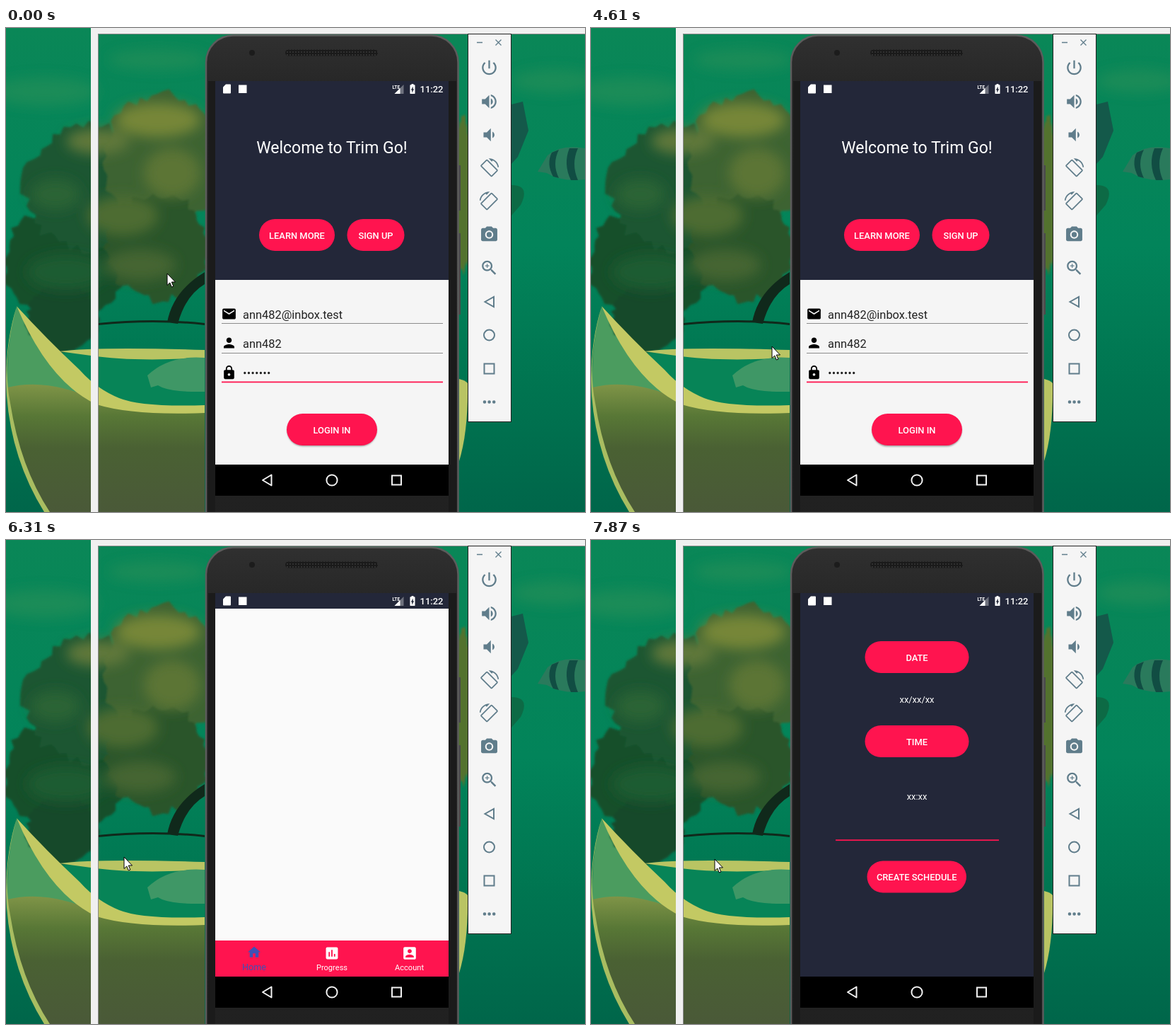
These frames come from a looping animation (819 px wide and 684 px high, 8000 ms). An HTML page:

```html
<!DOCTYPE html>
<html lang="en">
<head>
<meta charset="utf-8">
<title>Phone emulator</title>
<style>
  html, body { margin: 0; width: 100%; height: 100%; overflow: hidden; background: #00704e; }
  svg.stage { display: block; width: 100%; height: 100%; }
  text { font-family: Roboto, "Open Sans", sans-serif; }
  .btn rect { fill: #ff144f; }
  .btn text { fill: #fff; font-size: 12.9px; font-weight: 500; text-anchor: middle; }
  .mid { text-anchor: middle; }
  .field { font-size: 16.4px; fill: #212121; }
  .tab { font-size: 11.1px; fill: #fff; text-anchor: middle; }
  .line { fill: none; stroke-width: 2; }
</style>
</head>
<body>
<svg class="stage" viewBox="0 0 819 684">
  <defs>
    <linearGradient id="sea" x1="0" y1="0" x2="0" y2="1">
      <stop offset="0" stop-color="#0a8757"/>
      <stop offset=".45" stop-color="#02845a"/>
      <stop offset=".75" stop-color="#007450"/>
      <stop offset="1" stop-color="#00664a"/>
    </linearGradient>
    <linearGradient id="ground" x1="0" y1="0" x2="0" y2="1">
      <stop offset="0" stop-color="#7f9447"/>
      <stop offset=".25" stop-color="#587736"/>
      <stop offset=".5" stop-color="#4a6133"/>
      <stop offset="1" stop-color="#4a5938"/>
    </linearGradient>
    <linearGradient id="body" x1="0" y1="0" x2="0" y2="1">
      <stop offset="0" stop-color="#303030"/>
      <stop offset=".1" stop-color="#262626"/>
      <stop offset="1" stop-color="#202020"/>
    </linearGradient>
    <filter id="soft" x="-30%" y="-60%" width="160%" height="220%"><feGaussianBlur stdDeviation="9"/></filter>
    <filter id="edge" x="-5%" y="-5%" width="110%" height="110%"><feGaussianBlur stdDeviation="1.5"/></filter>
    <filter id="drop" x="-10%" y="-20%" width="120%" height="150%"><feGaussianBlur stdDeviation="1.1"/></filter>
    <clipPath id="glass"><rect x="296" y="75" width="330" height="586"/></clipPath>
    <pattern id="mesh" width="4" height="4" patternUnits="userSpaceOnUse">
      <rect width="4" height="4" fill="#1a1a1a"/><circle cx="2" cy="2" r=".9" fill="#3a3a3a"/>
    </pattern>

    <path id="power" d="M13 3h-2v10h2V3zm4.83 2.17l-1.42 1.42C17.99 7.86 19 9.81 19 12c0 3.87-3.13 7-7 7s-7-3.13-7-7c0-2.19 1.01-4.14 2.58-5.42L6.17 5.17C4.23 6.82 3 9.26 3 12c0 4.97 4.03 9 9 9s9-4.03 9-9c0-2.74-1.23-5.18-3.17-6.83z"/>
    <path id="louder" d="M3 9v6h4l5 5V4L7 9H3zm13.5 3c0-1.77-1.02-3.29-2.5-4.03v8.05c1.48-.73 2.5-2.25 2.5-4.02zM14 3.23v2.06c2.89.86 5 3.54 5 6.71s-2.11 5.85-5 6.71v2.06c4.01-.91 7-4.49 7-8.77s-2.99-7.86-7-8.77z"/>
    <path id="quieter" d="M18.5 12c0-1.77-1.02-3.29-2.5-4.03v8.05c1.48-.73 2.5-2.25 2.5-4.02zM5 9v6h4l5 5V4L9 9H5z"/>
    <path id="turn" d="M16.48 2.52c3.27 1.55 5.61 4.72 5.97 8.48h1.5C23.44 4.84 18.29 0 12 0l-.66.03 3.81 3.81 1.33-1.32zm-6.25-.77c-.59-.59-1.54-.59-2.12 0L1.75 8.11c-.59.59-.59 1.54 0 2.12l12.02 12.02c.59.59 1.54.59 2.12 0l6.36-6.36c.59-.59.59-1.54 0-2.12L10.23 1.75zm4.6 19.44L2.81 9.17l6.36-6.36 12.02 12.02-6.36 6.36z"/>
    <g id="camera">
      <path fill-rule="evenodd" d="M9 2L7.17 4H4c-1.1 0-2 .9-2 2v12c0 1.1.9 2 2 2h16c1.1 0 2-.9 2-2V6c0-1.1-.9-2-2-2h-3.17L15 2H9zm3 15c-2.76 0-5-2.24-5-5s2.24-5 5-5 5 2.24 5 5-2.24 5-5 5z"/>
      <circle cx="12" cy="12" r="3.2"/>
    </g>
    <path id="zoom" d="M15.5 14h-.79l-.28-.27C15.41 12.59 16 11.11 16 9.5 16 5.91 13.09 3 9.5 3S3 5.91 3 9.5 5.91 16 9.5 16c1.61 0 3.09-.59 4.23-1.57l.27.28v.79l5 4.99L20.49 19l-4.99-5zm-6 0C7.01 14 5 11.99 5 9.5S7.01 5 9.5 5 14 7.01 14 9.5 11.99 14 9.5 14zM9 7h1v2h2v1h-2v2H9v-2H7V9h2z"/>
    <path id="mail" d="M20 4H4c-1.1 0-1.99.9-1.99 2L2 18c0 1.1.9 2 2 2h16c1.1 0 2-.9 2-2V6c0-1.1-.9-2-2-2zm0 4l-8 5-8-5V6l8 5 8-5v2z"/>
    <path id="person" d="M12 12c2.21 0 4-1.79 4-4s-1.79-4-4-4-4 1.79-4 4 1.79 4 4 4zm0 2c-2.67 0-8 1.34-8 4v2h16v-2c0-2.66-5.33-4-8-4z"/>
    <path id="lock" d="M18 8h-1V6c0-2.76-2.24-5-5-5S7 3.24 7 6v2H6c-1.1 0-2 .9-2 2v10c0 1.1.9 2 2 2h12c1.1 0 2-.9 2-2V10c0-1.1-.9-2-2-2zm-6 9c-1.1 0-2-.9-2-2s.9-2 2-2 2 .9 2 2-.9 2-2 2zm3.1-9H8.9V6c0-1.71 1.39-3.1 3.1-3.1 1.71 0 3.1 1.39 3.1 3.1v2z"/>
    <path id="house" d="M10 20v-6h4v6h5v-8h3L12 3 2 12h3v8z"/>
    <path id="chart" d="M19 3H5c-1.1 0-2 .9-2 2v14c0 1.1.9 2 2 2h14c1.1 0 2-.9 2-2V5c0-1.1-.9-2-2-2zM9 17H7v-7h2v7zm4 0h-2V7h2v10zm4 0h-2v-4h2v4z"/>
    <path id="account" fill-rule="evenodd" d="M3 5v14c0 1.1.89 2 2 2h14c1.1 0 2-.9 2-2V5c0-1.1-.9-2-2-2H5c-1.11 0-2 .9-2 2zm12 4c0 1.66-1.34 3-3 3s-3-1.34-3-3 1.34-3 3-3 3 1.34 3 3zm-9 8c0-2 4-3.1 6-3.1s6 1.1 6 3.1v1H6v-1z"/>
    <path id="battery" d="M15.67 4H14V2h-4v2H8.33C7.6 4 7 4.6 7 5.33v15.33C7 21.4 7.6 22 8.33 22h7.33c.74 0 1.34-.6 1.34-1.33V5.33C17 4.6 16.4 4 15.67 4zM11 20v-5.5H9L13 7v5.5h2L11 20z"/>
  </defs>

  <!-- wallpaper -->
  <rect width="819" height="684" fill="url(#sea)"/>
  <g filter="url(#soft)" fill="#2f9259" opacity=".5">
    <ellipse cx="55" cy="90" rx="75" ry="20"/>
    <ellipse cx="215" cy="45" rx="70" ry="14"/>
    <ellipse cx="775" cy="75" rx="60" ry="16"/>
  </g>
  <path d="M15 394Q30 440 75 458L281 466V684H58Q-12 570 4 470Z" fill="#078457"/>
  <path d="M15 394L110 520 60 540 2 520Q0 440 15 394Z" fill="#4b9c5f"/>
  <path d="M2 508Q50 496 110 518T281 543V684H58Q8 600 2 508Z" fill="url(#ground)"/>
  <g id="crown" filter="url(#edge)"></g>
  <g id="sunlit" filter="url(#soft)"></g>
  <path d="M228 416Q236 372 281 345V362Q254 378 243 418ZM130 417Q210 409 281 417V420Q210 412 130 420Z" fill="#10291b"/>
  <path d="M75 457Q130 450 281 455V466Q180 472 120 463Z" fill="#b9c463"/>
  <path d="M15 393Q58 440 104 483 128 510 160 523T281 533V544Q180 548 128 532 60 500 15 393Z" fill="#c3c963"/>
  <path d="M200 491Q230 462 281 466V514Q230 515 215 505L205 508Z" fill="#3f9766"/>
  <path d="M15 394Q-6 470 6 530Q20 620 62 684H54Q8 610 1 520Q-3 450 15 394Z" fill="#a9bd61"/>
  <path d="M641 496Q650 498 653 502Q654 570 641 612Z" fill="#b9c463"/>
  <path d="M715 108L731 104 739 145 724 182 715 192Z" fill="#14594a"/>
  <path d="M715 222Q742 222 728 250L715 265Z" fill="#0d6a45"/>
  <path d="M752 203L766 180Q785 164 819 170V214Q785 218 765 205Z" fill="#2a7a5c"/>
  <path d="M772 176Q764 192 774 210L782 212Q772 192 782 172ZM797 170Q788 192 799 215L809 215Q799 192 809 170Z" fill="#114d43"/>

  <!-- window frame -->
  <path d="M120 0H819V8H130V684H120Z" fill="#f0f0f0"/>
  <path d="M130.5 684V8.5H819" fill="none" stroke="#888"/>

  <!-- phone -->
  <path d="M640 194h3v64h-3zM640 290h3v115h-3z" fill="#4a4a4a"/>
  <rect x="283" y="10.5" width="356.5" height="760" rx="38" fill="url(#body)" stroke="#5c5c5c" stroke-width="2.5"/>
  <path d="M286 75h10v609h-10zM626 75h11v609h-11z" fill="#1b1b1b"/>
  <circle cx="348" cy="35" r="4" fill="#1c1c1c"/>
  <rect x="395" y="30.5" width="131" height="9" rx="4.5" fill="url(#mesh)"/>

  <g clip-path="url(#glass)">
    <g id="login">
      <rect x="296" y="75" width="330" height="281" fill="#232739"/>
      <rect x="296" y="356" width="330" height="261" fill="#f5f5f5"/>
      <rect x="296" y="617" width="330" height="44"/>
      <text class="mid" x="461" y="177" font-size="23" fill="#fff">Welcome to Trim Go!</text>
      <rect id="shade" x="397.5" y="545" width="127" height="45" rx="22.5" opacity=".36" filter="url(#drop)"/>
      <g id="loginButtons"></g>
      <text class="field" x="335" y="410.5">ann482@inbox.test</text>
      <text class="field" x="335" y="452">ann482</text>
      <path d="M337.8 487.5h36" stroke="#212121" stroke-width="3.3" stroke-linecap="round" stroke-dasharray="0 5.65"/>
      <path d="M305 417.5H618M305 459.5H618" stroke="#8c8c8c"/>
      <rect x="305" y="499.5" width="313" height="1.8" fill="#ff144f"/>
      <rect id="caret" x="374" y="476" width="1.7" height="22" fill="#ff144f"/>
      <g id="fieldIcons"></g>
    </g>
    <g id="home">
      <rect x="296" y="75" width="330" height="22" fill="#232739"/>
      <rect x="296" y="97" width="330" height="469" fill="#fafafa"/>
      <rect id="tabBar" x="296" y="566" width="330" height="51"/>
      <rect x="296" y="617" width="330" height="44"/>
      <g id="tabIcons"></g>
      <text class="tab" x="351" y="608" style="font-size:12.7px;fill:#3f51b5">Home</text>
      <text class="tab" x="461" y="608">Progress</text>
      <text class="tab" x="570.5" y="608">Account</text>
    </g>
    <g id="plan">
      <rect x="296" y="75" width="330" height="542" fill="#232739"/>
      <rect x="296" y="617" width="330" height="44"/>
      <g id="planButtons"></g>
      <g class="mid" fill="#fff" font-size="12.9">
        <text x="461" y="230">xx/xx/xx</text>
        <text x="461" y="367">xx:xx</text>
      </g>
      <rect x="346" y="423.3" width="231" height="1.8" fill="#ff144f"/>
      <rect id="planCaret" x="461" y="399.5" width="1.7" height="22" fill="#ff144f"/>
    </g>

    <!-- system bars -->
    <g fill="#fff">
      <path d="M311 79.5h6q1 0 1 1v11q0 1-1 1h-9q-1 0-1-1V83.500z"/>
      <rect x="329" y="80.5" width="11.5" height="11.5"/>
      <text x="546.5" y="85.5" font-size="6.5" font-weight="700">LTE</text>
      <path d="M562.5 80V93H549.500Z" opacity=".35"/>
      <path d="M557.5 85V93H549.500Z"/>
      <text x="585.5" y="91" font-size="13" font-weight="500">11:22</text>
    </g>
    <g id="statusIcons"></g>
    <g class="line" stroke="#f2f2f2">
      <path d="M375.5 631.5V646.5L363 639Z" stroke-linejoin="round"/>
      <circle cx="461" cy="639" r="7.6"/>
      <rect x="546" y="632.5" width="13" height="13"/>
    </g>
  </g>

  <!-- emulator controls -->
  <rect x="653.5" y="8.5" width="61" height="548" fill="#f5f5f5" stroke="#222"/>
  <path d="M666 20.5h8M692.5 16.5l8 8M700.5 16.5l-8 8" stroke="#607d8b" stroke-width="1.3"/>
  <g id="controls"></g>
  <g class="line" stroke="#607d8b">
    <path d="M690 380V394L677.5 387Z"/>
    <circle cx="683.5" cy="434" r="7.5"/>
    <rect x="676.5" y="474.5" width="14" height="14"/>
  </g>
  <path d="M677 528.5h14" stroke="#607d8b" stroke-width="4.6" stroke-linecap="round" stroke-dasharray="0 6.6"/>

  <path id="mouse" d="M0 0V16.5L3.8 13 6.3 19 8.8 18 6.3 12H11.5Z" fill="#fff" stroke="#000"/>
</svg>

<script>
const $ = id => document.getElementById(id);

function add(parent, tag, attrs, text = '') {
  const node = document.createElementNS('http://www.w3.org/2000/svg', tag);
  for (const key in attrs) node.setAttribute(key, attrs[key]);
  node.textContent = text;
  return parent.appendChild(node);
}

function icon(parent, name, x, y, size, fill, flip = 1) {
  const k = size / 24;
  const transform = `translate(${x} ${y}) scale(${k * flip} ${k}) translate(-12 -12)`;
  add($(parent), 'use', { href: '#' + name, fill, transform });
}

function button(parent, label, x, y, width) {
  const g = add($(parent), 'g', { class: 'btn' });
  add(g, 'rect', { x, y, width, height: 45, rx: 22.5 });
  add(g, 'text', { x: x + width / 2, y: y + 27.5 }, label);
}

let seed = 7;
const rnd = () => (seed = seed * 16807 % 2147483647) / 2147483647;

// Leafy patch with a ragged rim
function leaves(x, y, rx, ry, fill) {
  const points = Array.from({ length: 64 }, (_, i) => {
    const a = i / 32 * Math.PI;
    const k = 0.88 + rnd() * 0.17;
    return `${x + Math.cos(a) * rx * k},${y + Math.sin(a) * ry * k}`;
  });
  add($('crown'), 'polygon', { points: points.join(' '), fill });
}

function glow(cx, cy, rx, ry, fill) {
  add($('sunlit'), 'ellipse', { cx, cy, rx, ry, fill });
}

[
  [85, 330, 90, 82, '#124f2c'], [118, 225, 95, 92, '#1d5730'], [222, 190, 85, 100, '#3c6430'],
  [215, 310, 75, 78, '#29552b'], [80, 410, 52, 48, '#12492b'], [647, 235, 14, 110, '#53722f']
].forEach(p => leaves(...p));
[
  [215, 130, 60, 24, '#768639'], [130, 160, 45, 18, '#60783a'], [235, 205, 40, 35, '#5c7534'],
  [165, 265, 50, 28, '#4d6c30'], [190, 335, 50, 22, '#456530'], [70, 235, 35, 22, '#2a6335'],
  [85, 345, 55, 25, '#1f5c30']
].forEach(p => glow(...p));

button('loginButtons', 'LEARN MORE', 358, 270, 107);
button('loginButtons', 'SIGN UP', 482.5, 270, 81);
button('loginButtons', 'LOGIN IN', 397, 545, 128);
button('planButtons', 'DATE', 387.5, 143, 147);
button('planButtons', 'TIME', 387.5, 262, 147);
button('planButtons', 'CREATE SCHEDULE', 390.5, 453.5, 140.5);

icon('fieldIcons', 'mail', 315.5, 404, 22.5, '#000');
icon('fieldIcons', 'person', 315.5, 445, 22.5, '#000');
icon('fieldIcons', 'lock', 315.5, 487, 22, '#000');
icon('tabIcons', 'house', 351, 582.5, 21.5, '#3f51b5');
icon('tabIcons', 'chart', 461, 584, 22.5, '#fff');
icon('tabIcons', 'account', 571, 584, 23.5, '#fff');
icon('statusIcons', 'battery', 575, 86, 17, '#fff');
[
  ['power', 56], ['louder', 104], ['quieter', 151], ['turn', 198],
  ['turn', 245, -1], ['camera', 292], ['zoom', 339]
].forEach(([name, y, flip]) => icon('controls', name, 683.5, y, 27.5, '#607d8b', flip));

const LOOP = 8000;
const pointer = [
  [0, 228, 347], [420, 219, 326], [540, 222, 284], [670, 236, 257],
  [810, 248, 258], [930, 268, 264], [1060, 288, 272], [1170, 302, 279], [1290, 310, 283],
  [1870, 303.5, 287.5], [1990, 324, 401], [2140, 306, 442], [2260, 279, 458],
  [2410, 256, 451], [2560, 256, 450],
  [6060, 226, 434], [6180, 186, 436], [6310, 167, 448], [6460, 175, 451]
];
const blink = [[0, 0], [150, 1], [670, 0], [1170, 1], [1590, 0], [2140, 1], [2560, 0], [3120, 1], [3640, 0], [4060, 1], [4610, 0]];
const lift = [[0, 1.3], [3520, 2.6], [3640, 3.8], [3940, 3], [4060, 1.6]];
// time, opacity, vertical offset
const homeIn = [[0, 0, 0], [5300, 0.28, 36.5], [5450, 1, 2], [5600, 1, 0]];
const planIn = [[0, 0, 0], [7450, 1, 2], [7600, 1, 0]];

const at = (table, t) => table.findLast(row => row[0] <= t);

function slide(id, table, t) {
  const [, alpha, dy] = at(table, t);
  $(id).setAttribute('opacity', alpha);
  $(id).setAttribute('transform', `translate(0 ${dy})`);
}

function render(t) {
  const [, x, y] = at(pointer, t);
  $('mouse').setAttribute('transform', `translate(${x} ${y})`);
  $('caret').setAttribute('opacity', at(blink, t)[1]);
  $('shade').setAttribute('transform', `translate(0 ${at(lift, t)[1]})`);
  slide('home', homeIn, t);
  slide('plan', planIn, t);
  $('tabBar').setAttribute('fill', t < 6890 ? '#ff144f' : '#232739');
  $('planCaret').setAttribute('opacity', t >= 7600 && t < 7870 ? 1 : 0);
}

const start = performance.now();
function tick() {
  render((performance.now() - start) % LOOP);
  requestAnimationFrame(tick);
}
render(0);
requestAnimationFrame(tick);
</script>
</body>
</html>
```
